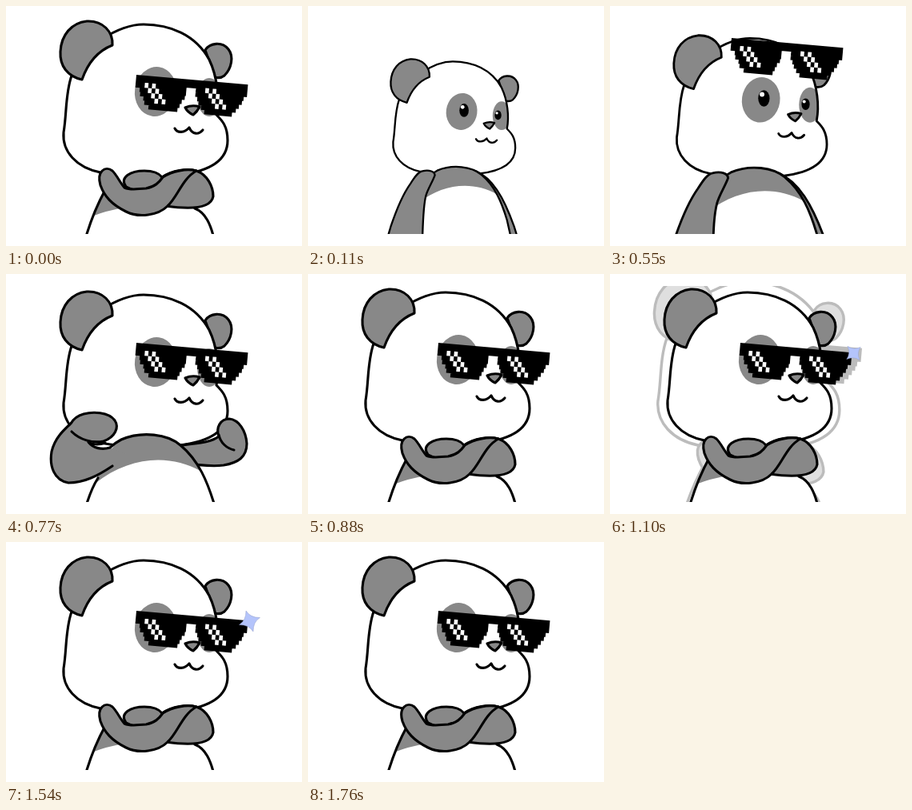
An HTML page for the animation above (1870 ms loop, 370 px wide and 300 px high).

```html
<!DOCTYPE html>
<html lang="en">
<head>
<meta charset="utf-8">
<title>Cool panda</title>
<style>
  html, body { margin: 0; width: 100%; height: 100%; overflow: hidden; background: #fff; }
  svg { display: block; width: 100%; height: 100%; }
  .ink { stroke: #000; stroke-width: 3.1; stroke-linecap: round; stroke-linejoin: round; }
  .fur { fill: #888; }
  .white { fill: #fff; }
  .line { fill: none; }
</style>
</head>
<body>
<svg viewBox="0 0 370 300">
  <defs>
    <clipPath id="view"><rect x="47" y="15" width="277" height="270"/></clipPath>
    <path id="skull" d="M82 87C74 110 76 135 72 158C70 182 88 202 118 208C150 214 190 215 217 211C250 207 277 196 277 168C277 150 270 143 263 136C267 115 264 88 254 67C237 36 205 23 172 23C142 23 95 50 82 87Z"/>
    <clipPath id="inside"><use href="#skull"/></clipPath>
  </defs>
  <g clip-path="url(#view)">
    <use id="ghost" href="#panda"/>
    <g id="trace" fill="#ccc" stroke="#999">
      <path d="M87 216L93 205L118 209V222Z"/>
      <path d="M277 82L284 80L282 96H275Z"/>
    </g>
    <g id="panda">
      <g class="zoom">
        <g class="head">
          <path class="fur ink" d="M249 55C255 46 270 44 278 54C285 63 282 78 273 87Q268 91 261 89Z"/>
          <use href="#skull" class="white"/>
          <g clip-path="url(#inside)">
            <ellipse class="fur" cx="187" cy="107" rx="26" ry="31" transform="rotate(8 187 107)"/>
            <ellipse class="fur" cx="254" cy="114" rx="15" ry="24"/>
          </g>
          <ellipse cx="191" cy="105" rx="7.8" ry="11.3"/>
          <circle class="white" cx="188.5" cy="99.5" r="3.2"/>
          <ellipse cx="248" cy="113" rx="5.6" ry="8"/>
          <circle class="white" cx="246" cy="109.5" r="2.2"/>
          <use href="#skull" class="line ink"/>
          <path class="fur ink" d="M95 92C77 88 67 75 68 57C69 36 82 21 101 19C121 18 134 32 133 49C115 56 102 72 95 92Z"/>
        </g>

        <g id="idle">
          <path class="fur ink" d="M211 210C238 222 257 252 275 303L285 335H240Z"/>
          <use href="#torso" x="2" y="2"/>
          <path class="fur ink" d="M60 330L68 303C74 285 86 252 101 231C108 220 114 211 121 210C133 207 142 211 142 217C138 228 130 240 127 251C123 266 122 285 121 330Z"/>
        </g>

        <g id="flex">
          <path class="fur ink" d="M213 215C235 211 254 212 266 203C262 192 268 181 279 181C291 182 300 196 301 212C301 229 290 236 272 239C258 241 246 239 234 238Z"/>
          <path class="line ink" d="M266 201C268 211 276 218 285 220"/>
          <g id="torso">
            <path class="white" d="M90 330L100 290C108 262 122 222 144 207C170 196 202 200 218 214C241 233 252 260 261 290L270 330Z"/>
            <path class="fur" d="M111 262C119 240 128 218 144 207C170 196 202 200 218 214C230 224 236 233 243 246C205 225 155 227 111 262Z"/>
            <path class="line ink" d="M90 330L100 290C104 277 108 266 115 255M129 218C134 213 138 210 144 207C170 196 202 200 218 214C241 233 252 260 261 290L270 330"/>
          </g>
          <path class="fur" d="M134 240C115 252 98 261 78 261C60 258 54 240 57 222C61 205 72 195 82 186L128 200L104 208C110 218 120 219 130 217L150 225Z"/>
          <path class="line ink" d="M133 240C115 252 98 261 78 261C60 258 54 240 57 222C61 205 72 195 82 186M103 210C109 218 120 220 130 217"/>
          <path class="fur ink" d="M82 197C92 207 108 212 122 209C136 204 142 192 136 183C128 172 108 172 97 175Q86 178 81 187"/>
          <path class="line ink" d="M104 211Q114 215 124 211"/>
        </g>

        <g id="cross">
          <path class="white" d="M98 295C105 270 113 250 124 230H236V253C249 258 256 272 261 295Z"/>
          <path class="fur" d="M110 262Q125 256 148 252L124 230Z"/>
          <path class="line ink" d="M98 295C105 270 113 250 124 230M236 253C249 258 256 272 261 295"/>
          <path class="white" d="M128 203H232V212L196 216L150 226Z"/>
          <path class="fur ink" d="M150 226C141 214 156 206 173 206C185 206 192 210 195 214C208 205 226 203 238 206C252 211 259 226 259 238C256 254 228 254 200 250Z"/>
          <path class="fur ink" d="M118 224C113 207 124 199 133 206C139 212 142 220 148 227C157 231 166 228 175 228C186 226 191 221 196 214C208 206 226 203 238 206C220 216 215 238 202 250C190 262 166 265 150 257C132 248 123 238 118 224Z"/>
        </g>
      </g>
      <g id="shades"></g>
      <g class="zoom">
        <g class="head">
          <path class="fur ink" d="M224 127Q233 123 242 126Q239 132 234 136Q227 133 224 127Z"/>
          <path class="line ink" d="M211 153C214 159 223 159 229 152C233 161 241 161 246 155"/>
        </g>
      </g>
    </g>
    <path id="star" fill="#b4c4fb" stroke="#8f9cc8" stroke-width=".6" d="M0-18Q3-5 18 0Q5 3 0 18Q-3 5-18 0Q-5-3 0-18Z"/>
  </g>
</svg>
<script>
const STEP = 110, COUNT = 17;
const $ = id => document.getElementById(id);
const put = (el, value) => el.setAttribute('transform', value);
const show = (el, on) => { el.style.display = on ? '' : 'none'; };

// Pixel glasses: spans of black per row, in cells of w by h
function buildShades() {
  const w = 5.6, h = 5.2;
  const rows = [
    [0, 25], [0, 25],
    [0, 11.4, 13.5, 25],
    [1, 11.4, 13.5, 24.3],
    [1.2, 11.2, 14, 24],
    [2, 10.6, 14.4, 23.4],
    [2.3, 10.2, 15, 22.8],
    [3.3, 9.8, 15.8, 22]
  ];
  let black = '', white = '';
  const box = (x, y, dx, dy) => `M${x} ${y}h${dx}v${dy}h${-dx}z`;
  rows.forEach((row, y) => {
    for (let i = 0; i < row.length; i += 2)
      black += box(row[i] * w, y * h, (row[i + 1] - row[i]) * w, h + 0.2);
  });
  for (const left of [11.5, 87.5])
    for (let i = 0; i < 4; i++)
      for (const gap of [0, 2])
        white += box(left + (i + gap) * 4.6, 9 + i * 6.2, 4.6, 6.2);
  $('shades').innerHTML = `<path d="${black}"/><path class="white" d="${white}"/>`;
}

const starSize = k => k < 9 ? 0 : k <= 12 ? 1 - (12 - k) * 0.18 : k < 16 ? 1 - (k - 12) * 0.12 : 0;

function draw(ms) {
  const k = Math.floor(ms / STEP) % COUNT;
  const pose = k === 0 || k > 7 ? 'cross' : k === 7 ? 'flex' : 'idle';
  const left = k === 0 ? 0 : Math.max(0, 7 - k);

  for (const name of ['idle', 'flex', 'cross']) show($(name), name === pose);
  const s = 1 - left * 0.0425;
  document.querySelectorAll('.zoom').forEach(g =>
    put(g, `translate(207 196) scale(${s}) translate(-207 -196)`));
  document.querySelectorAll('.head').forEach(g =>
    put(g, `translate(0 ${pose === 'cross' ? 0 : 3})`));
  put($('shades'), `translate(${163 - left * 5.5} ${86 - left * 23}) rotate(5)`);

  // Fading echo that grows behind the panda
  const age = k - 8;
  show($('ghost'), age > 0 && age < 4);
  const grow = 1 + age * 0.0535;
  put($('ghost'), `translate(185 150) scale(${grow}) translate(-185 -150)`);
  $('ghost').style.opacity = 0.5 - age * 0.12;
  show($('trace'), k === 12 || k === 13);

  const size = starSize(k);
  show($('star'), size > 0);
  put($('star'), `translate(304.5 99) rotate(${15 + (12 - k) * 17}) scale(${size})`);
}

buildShades();
const start = performance.now();
function tick() {
  draw(performance.now() - start);
  requestAnimationFrame(tick);
}
tick();
</script>
</body>
</html>
```
